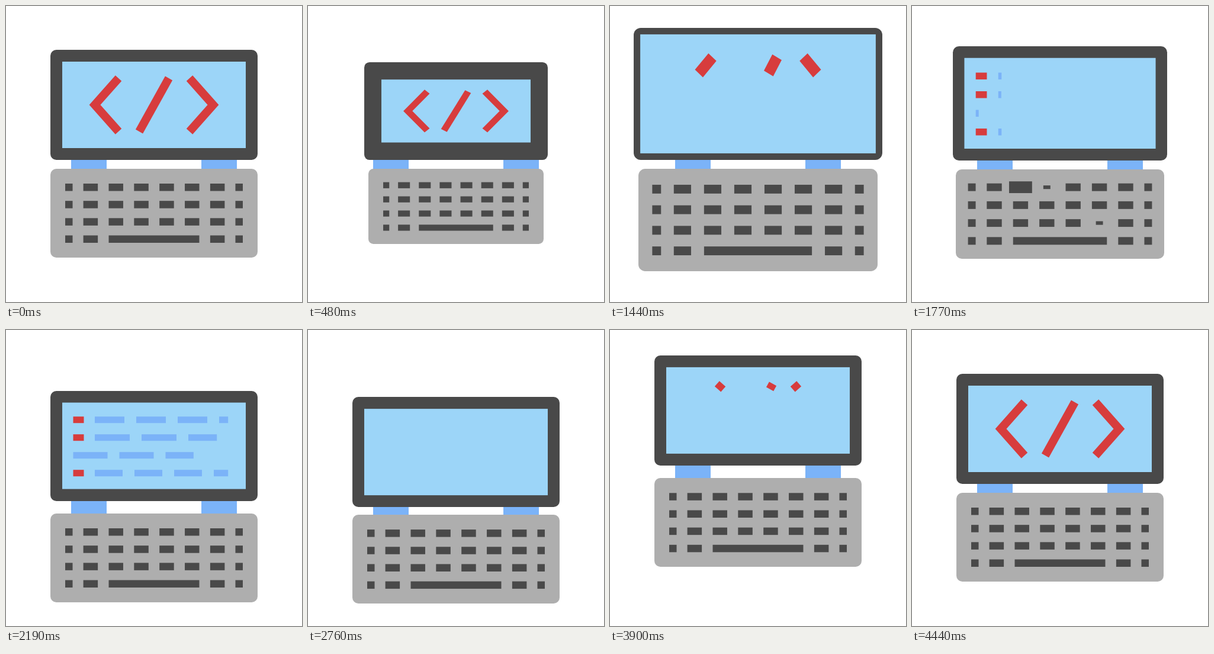
Write an HTML page with a canvas that moves like this. It is 500 by 500 pixels and loops after 4.5 s.

```html
<!DOCTYPE html>
<html lang="en">
<head>
<meta charset="utf-8">
<title>Jumping laptop</title>
<style>
  html, body { margin: 0; width: 100%; height: 100%; overflow: hidden; background: #fff; }
  canvas { display: block; width: 500px; height: 500px; }
</style>
</head>
<body>
<canvas id="stage" width="500" height="500"></canvas>
<script>
const ctx = document.getElementById('stage').getContext('2d');
const LOOP = 4500, STEP = 30;
const DARK = '#494949', GREY = '#aeaeae', SKY = '#9cd5f8', BLUE = '#7bb3f8', RED = '#d73c3d';

const ease = p => p < 0.5 ? 2 * p * p : 1 - 2 * (1 - p) ** 2;
const clamp = p => Math.max(0, Math.min(1, p));

// Eases through the values; each span gives the start and end step of one move.
const path = (values, ...spans) => n => spans.reduce(
  (v, [start, end], i) => v + (values[i + 1] - values[i]) * ease(clamp((n - start) / (end - start))),
  values[0]);

const SWELL = [1, 0.8, 1.2, 1];
const JUMP = [0, 40, -40, 0];

const screenScale = path(SWELL, [10.7, 20.7], [30.8, 40.1], [52, 62]);
const boardScale = path(SWELL, [9.4, 19.5], [19.6, 39.3], [41, 61.5]);
const keyScale = path(SWELL, [1, 20.3], [22, 42.5], [45, 65]);
const bezel = path([20, 30, 10, 20], [1, 19], [22, 43], [44, 61]);
const screenDrop = path(JUMP, [56.5, 83], [90.5, 111], [121, 148]);
const boardDrop = path(JUMP, [56.5, 78.5], [89.3, 109.3], [116, 148]);
const glyph = path([1, 0, 1], [40, 52], [126, 144]);
const typed = path([0, 1, 0, 1, 0], [57, 76], [78, 90], [94, 110], [114, 128]);

function box(x, y, w, h, color) {
  ctx.fillStyle = color;
  ctx.fillRect(x, y, w, h);
}

// Rounded panel centred on the stage, with edges on whole pixels.
function panel(top, w, h, r, color) {
  const x = Math.round(250 - w / 2), y = Math.round(top);
  ctx.fillStyle = color;
  ctx.beginPath();
  ctx.roundRect(x, y, 500 - 2 * x, Math.round(top + h) - y, r);
  ctx.fill();
}

function stroke(points, part) {
  if (part <= 0) return;
  let length = 0;
  points.forEach(([x, y], i) => {
    if (i) length += Math.hypot(x - points[i - 1][0], y - points[i - 1][1]);
  });
  ctx.setLineDash(part < 1 ? [length * part, length * 2] : []);
  ctx.beginPath();
  points.forEach(([x, y]) => ctx.lineTo(x, y));
  ctx.stroke();
}

function drawGlyph(part) {
  ctx.strokeStyle = RED;
  ctx.lineWidth = 14;
  for (const side of [-1, 1]) {
    stroke([[60, -45], [100, 0], [60, 45]].map(([x, y]) => [155 + side * x, 73 + y]), part);
  }
  stroke([[180, 28], [130, 118]], part);
}

function drawLines(part) {
  const dashes = [50, 59, 58, 47];
  dashes.forEach((dash, row) => {
    const y = 23.6 + row * 30;
    const tagged = row !== 2;
    const from = tagged ? 55 : 18.5;
    const full = dash > 50 ? 3 * dash + 40 : 237;
    const end = from + full * part;
    if (tagged) box(18.5, y, 18 * Math.min(1, part * 50), 11, RED);
    for (let x = from; x < end; x += dash + 20) box(x, y, Math.min(dash, end - x), 11, BLUE);
  });
}

function drawScreen(n) {
  const s = screenScale(n), b = bezel(n);
  const w = 350 * s, h = 186 * s, top = 260 + screenDrop(n) - h;
  panel(top, w, h, 10 * s, DARK);
  ctx.save();
  ctx.translate(250 - w / 2 + b, top + b);
  ctx.scale((w - 2 * b) / 310, (h - 2 * b) / 146);
  box(0, 0, 310, 146, SKY);
  drawGlyph(glyph(n));
  drawLines(typed(n));
  ctx.restore();
}

// Two hands walk over the keys; a pressed key dips, then bounces.
const hands = [{ start: 53, row: 0, col: 2 }, { start: 57, row: 2, col: 5 }];

function pressScale(row, col, n) {
  let scale = 1;
  for (const hand of hands) {
    for (let i = 0; i < 7; i++) {
      const p = (n - hand.start - 4 * i) / 8;
      const hit = row === (hand.row + (i >> 1)) % 3 && col === 1 + (hand.col - 1 + i) % 6;
      if (hit && p > 0 && p < 1) scale -= 0.53 * Math.sin(2 * Math.PI * p);
    }
  }
  return scale;
}

function drawKeys(n) {
  for (let row = 0; row < 4; row++) {
    const y = (row - 1.5) * 29.17;
    for (let col = 0; col < 8; col++) {
      if (row === 3 && col > 1 && col < 6) continue;
      const edge = col === 0 ? 1 : col === 7 ? -1 : 0;
      const k = pressScale(row, col, n);
      const w = (edge ? 12.5 : 24.5) * k, h = 12.5 * k;
      const x = (col - 3.5) * 300 / 7 + edge * 6.25;
      box(x - w / 2, y - h / 2, w, h, DARK);
    }
  }
  box(-76.5, 37.5, 153, 12.5, DARK);
}

function drawBoard(n) {
  const s = boardScale(n), k = keyScale(n), top = 275 + boardDrop(n);
  panel(top, 350 * s, 150 * s, 10 * s, GREY);
  ctx.save();
  ctx.translate(250, top + 75 * s);
  ctx.scale(k, k);
  drawKeys(n);
  ctx.restore();
}

function draw(n) {
  box(0, 0, 500, 500, '#fff');
  const top = 255 + screenDrop(n), height = 25 + boardDrop(n) - screenDrop(n);
  for (const x of [110, 330]) box(x, top, 60, height, BLUE);
  drawScreen(n);
  drawBoard(n);
}

const begin = performance.now();
function tick() {
  draw(Math.floor((performance.now() - begin) % LOOP / STEP));
  requestAnimationFrame(tick);
}
tick();
</script>
</body>
</html>
```
